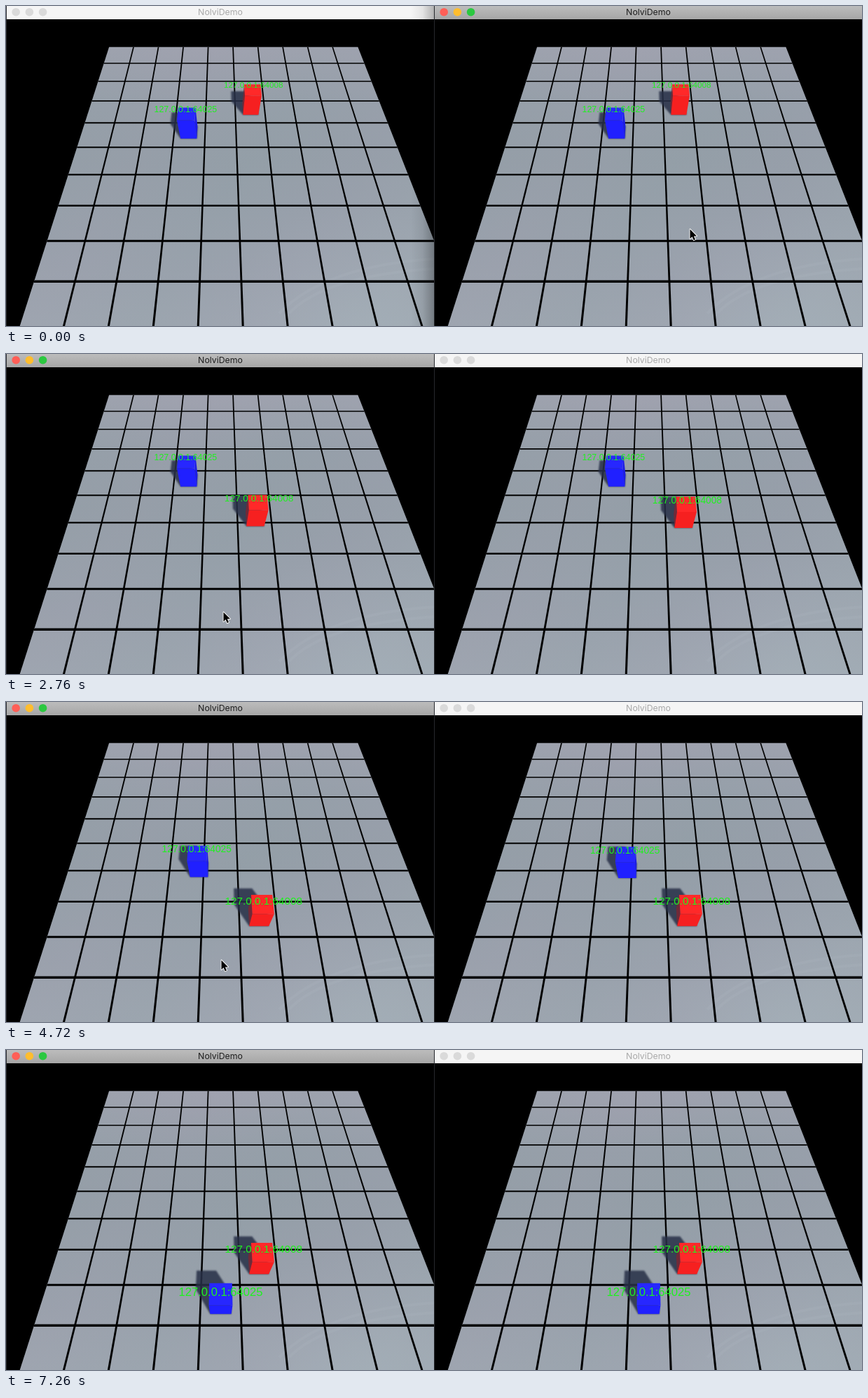
An HTML page with a canvas for the animation above (7710 ms loop, 1222 px wide and 458 px high).

```html
<!DOCTYPE html>
<html lang="en">
<head>
<meta charset="utf-8">
<title>NolviDemo</title>
<style>
html, body { margin: 0; width: 100%; height: 100%; overflow: hidden; background: #000; }
canvas { display: block; }
</style>
</head>
<body>
<canvas id="stage" width="1222" height="458"></canvas>
<script>
const ctx = document.getElementById('stage').getContext('2d');
const LOOP = 7710, PANE = 611, BAR = 19, HEIGHT = 458, FOCUS_AT = 1670;

// The picture refreshes in even bursts: first ms, last ms, count
const bursts = [[0, 0, 1], [300, 1220, 6], [1390, 1810, 4], [2170, 3150, 6],
  [3300, 4240, 7], [4390, 5320, 7], [5470, 6500, 8], [6650, 7260, 5]];
const ticks = bursts.flatMap(([from, to, n]) => Array.from({ length: n }, (_, i) =>
  Math.floor((from + (to - from) * i / Math.max(1, n - 1)) / 10) * 10));

// Both boxes glide toward the viewer at a steady one cell per second
const boxes = [
  { label: '127.0.0.1:64008', from: 6.577, to: 2.513, begin: 275, lead: 60,
    x: () => 1.01, top: '#ff2929', front: '#f62020', side: '#702a38' },
  { label: '127.0.0.1:64025', from: 5.566, to: 1.49, begin: 3140, lead: 35,
    x: z => -0.25 * (z - 1.49), top: '#2727ff', front: '#2020ff', side: '#1c1ce4' }
];

// Pointer stops: ms, x, y
const stops = [[300, 976, 319], [1220, 276, 50], [1810, 285, 6], [2760, 310, 369],
  [3000, 307, 369], [6060, 307, 369], [6650, 1157, 445], [6800, 1190, 480]];

function mouseAt(t) {
  const next = stops.findIndex(s => s[0] > t);
  if (next < 1) return next ? stops[stops.length - 1].slice(1) : stops[0].slice(1);
  const a = stops[next - 1], b = stops[next];
  const k = (t - a[0]) / (b[0] - a[0]), e = k * k * (3 - 2 * k);
  return [a[1] + (b[1] - a[1]) * e, a[2] + (b[2] - a[2]) * e];
}

// Camera pitched down 60 degrees; one unit is one floor cell
const F = 397.7, CX = 306.5, CY = 248.2, CAM = 7.03, FAR = 10.22, LEFT = -4.486;

function project(x, h, z) {
  const d = 0.866 * (CAM - h) + 0.5 * z;
  const s = F / d;
  return [CX + x * s, CY - (0.5 * (h - CAM) + 0.866 * z) * s, s];
}

function poly(points, fill) {
  ctx.beginPath();
  points.forEach(p => ctx.lineTo(p[0], p[1]));
  ctx.closePath();
  ctx.fillStyle = fill;
  ctx.fill();
}

function ramp(gradient, ...colors) {
  colors.forEach((c, i) => gradient.addColorStop(i / (colors.length - 1), c));
  return gradient;
}
const linear = (x0, y0, x1, y1, ...colors) => ramp(ctx.createLinearGradient(x0, y0, x1, y1), ...colors);

// Rectangle lying on the floor
const patch = (x0, x1, z0, z1) =>
  [[x0, z0], [x1, z0], [x1, z1], [x0, z1]].map(([x, z]) => project(x, 0, z));

function drawFloor() {
  const ground = patch(LEFT, LEFT + 10, FAR, 0);
  poly(ground, linear(0, 59, 0, HEIGHT, '#a1a3b0', '#969fa9', '#949ea7', '#97a0aa', '#9ba2ad', '#9fa7b1'));
  poly(ground, linear(60, 160, 520, 460, 'rgba(146,160,166,.25)', 'rgba(156,158,172,.25)',
    'rgba(146,160,168,.25)', 'rgba(158,160,176,.25)', 'rgba(162,174,182,.35)'));
  poly(ground, ramp(ctx.createRadialGradient(500, 470, 20, 500, 470, 190),
    'rgba(170,184,192,.25)', 'rgba(170,184,192,0)'));

  ctx.strokeStyle = 'rgba(205,215,220,.06)';
  ctx.lineWidth = 4;
  for (const d of [0, 14]) {
    ctx.beginPath();
    ctx.moveTo(390 + d, 440);
    ctx.quadraticCurveTo(455, 372 + d, 612, 362 + d);
    ctx.stroke();
  }

  const half = 0.024;
  for (let i = 1; i < 10; i++) {
    const x = LEFT + i - 0.018, z = FAR - i;
    poly(patch(x - half, x + half, FAR, 0), '#000');
    poly(patch(LEFT, LEFT + 10, z + 0.028, z - 0.028), '#000');
  }
}

const W = 0.26, DEPTH = 0.5, TALL = 0.85;

function drawShadow({ x, z }) {
  const l = x - W, r = x + W, b = z + DEPTH, dx = -0.38, dz = 0.62;
  ctx.filter = 'blur(1px)';
  poly([[l, z], [r, z], [r, b], [r + dx, b + dz], [l + dx, b + dz], [l + dx, z + dz]]
    .map(([px, pz]) => project(px, 0, pz)), 'rgba(40,48,72,.86)');
  ctx.filter = 'none';
}

function drawBox({ x, z, top, front, side }) {
  const l = x - W, r = x + W, b = z + DEPTH;
  const face = (fill, ...pts) => poly(pts.map(p => project(...p)), fill);
  const edge = x > 0 ? Math.max(l, 0) : Math.min(r, 0);
  if (edge) face(side, [edge, 0, z], [edge, TALL, z], [edge, TALL, b], [edge, 0, b]);
  face(top, [l, TALL, z], [r, TALL, z], [r, TALL, b], [l, TALL, b]);
  face(front, [l, 0, z], [r, 0, z], [r, TALL, z], [l, TALL, z]);
}

function drawText(text, x, y, font, fill) {
  ctx.font = font;
  ctx.textAlign = 'center';
  ctx.fillStyle = fill;
  ctx.fillText(text, x, y);
}

function drawLabel({ x, z, label }) {
  const [px, py, s] = project(x, 1.05, z + 0.247);
  const size = 0.2525 * s;
  drawText(label, px, py + size * 0.36, size + 'px "Liberation Sans", Arial, sans-serif', 'rgb(30,242,30)');
}

function drawBar(active) {
  ctx.fillStyle = active ? linear(0, 0, 0, BAR, '#bcbcbc', '#a6a6a6') : '#f5f5f5';
  ctx.fillRect(0, 0, PANE, BAR);
  ['#ff5f57', '#ffbd2e', '#2bc840'].forEach((color, i) => {
    ctx.beginPath();
    ctx.arc(14.2 + 19.2 * i, 8.7, 5.8, 0, 7);
    ctx.fillStyle = active ? color : '#dadada';
    ctx.fill();
  });
  drawText('NolviDemo', 306, 13.3, '12.3px Inter, Roboto, sans-serif', active ? '#1e1e1e' : '#a9a9a9');
}

function drawPane(left, active, t, ahead) {
  const placed = boxes.map(b => {
    const run = Math.max(0, t + ahead * b.lead - b.begin) / 1000;
    const z = Math.max(b.to, b.from - run);
    return { ...b, z, x: b.x(z) };
  }).sort((a, b) => b.z - a.z);

  ctx.save();
  ctx.translate(left, 0);
  ctx.beginPath();
  ctx.rect(1, 0, PANE - 1, HEIGHT);
  ctx.clip();
  ctx.fillStyle = '#000';
  ctx.fillRect(0, 0, PANE, HEIGHT);
  drawFloor();
  [drawShadow, drawBox, drawLabel].forEach(draw => placed.forEach(draw));
  drawBar(active);
  ctx.restore();
}

function drawMouse([x, y]) {
  ctx.save();
  ctx.translate(x, y);
  const arrow = new Path2D('M.5 .5V14L3.6 11.2 5.8 16.2 8 15.2 5.9 10.4 10 10.2Z');
  ctx.lineJoin = 'round';
  ctx.strokeStyle = '#fff';
  ctx.lineWidth = 1.8;
  ctx.stroke(arrow);
  ctx.fillStyle = '#000';
  ctx.fill(arrow);
  ctx.restore();
}

function render(t) {
  const leftActive = t >= FOCUS_AT;
  ctx.fillStyle = '#26282c';
  ctx.fillRect(0, 0, 1222, HEIGHT);
  drawPane(0, leftActive, t, 0);
  drawPane(PANE, !leftActive, t, leftActive ? 1 : 0);
  if (!leftActive) {
    // The front window casts a soft shade on its neighbour
    ctx.fillStyle = linear(578, 0, 611, 0, 'rgba(0,0,0,0)', 'rgba(0,0,0,.07)', 'rgba(0,0,0,.28)');
    ctx.fillRect(578, 0, 33, HEIGHT);
  }
  drawMouse(mouseAt(t));
}

const start = performance.now();
let shown = -1;

function loop() {
  const now = Math.max(0, performance.now() - start) % LOOP;
  const tick = ticks.filter(t => t <= now).pop();
  if (tick !== shown) {
    shown = tick;
    render(tick);
  }
  requestAnimationFrame(loop);
}
loop();
</script>
</body>
</html>
```
